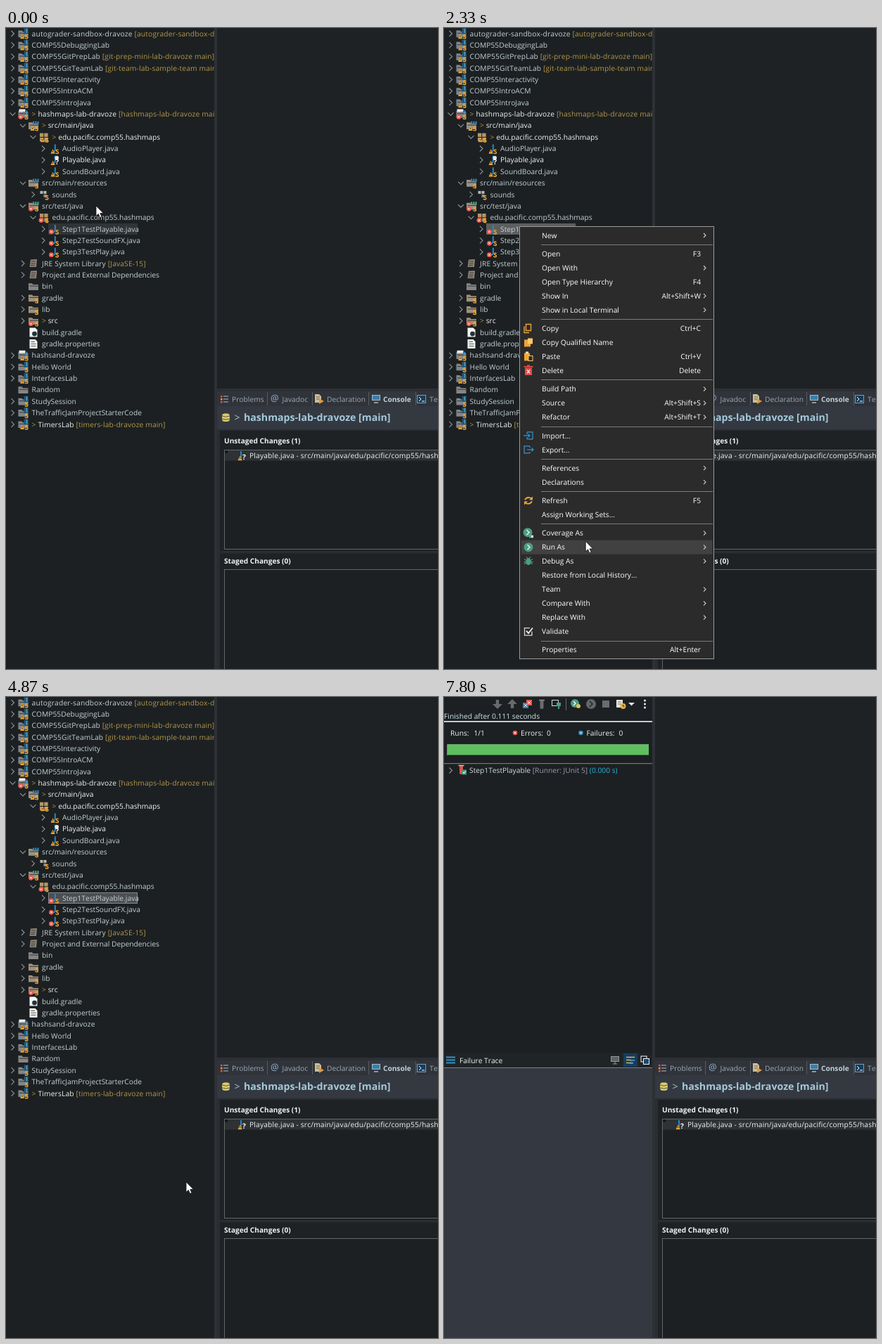
An HTML page that plays this animation: 614x912 px, repeating every 9390 ms.

```html
<!DOCTYPE html>
<html lang="en">
<head>
<meta charset="utf-8">
<title>Running a unit test from the project tree</title>
<style>
html, body { margin: 0; width: 100%; height: 100%; overflow: hidden; background: #1c2022; }
svg { display: block; }
text {
  font-family: "Open Sans", "Noto Sans", sans-serif; font-size: 10.25px; white-space: pre;
  font-kerning: none; font-variant-ligatures: none; text-rendering: geometricPrecision;
}
.bold { font-weight: 700; font-size: 10.15px; }
.end { text-anchor: end; }
.loose { letter-spacing: .15px; }
</style>
</head>
<body>
<svg id="stage" width="614" height="912" viewBox="0 0 614 912"></svg>
<script>
const LOOP = 9390;
const PALE = '#c4d0d4', WHITE = '#f0f2f2', TAN = '#b3964a', ORANGE = '#f0a732', BLUE = '#2f86bd', RED = '#f0574a', GREEN = '#4d9c80';

// Drawing helpers; y is the vertical middle of a line of text.
const rect = (x, y, w, h, fill, extra = '') => `<rect x="${x}" y="${y}" width="${w}" height="${h}" fill="${fill}" ${extra}/>`;
const path = (d, fill, extra = '') => `<path d="${d}" fill="${fill}" ${extra}/>`;
const line = (d, color, width = 1) => path(d, 'none', `stroke="${color}" stroke-width="${width}"`);
const dot = (x, y, r, fill) => `<circle cx="${x}" cy="${y}" r="${r}" fill="${fill}"/>`;
const text = (x, y, s, fill = PALE, extra = '') => `<text x="${x}" y="${y + 3.6}" fill="${fill}" ${extra}>${s}</text>`;
const span = (s, fill) => `<tspan fill="${fill}">${s}</tspan>`;
const at = (x, y, s) => `<g transform="translate(${x} ${y})">${s}</g>`;
const group = (id, s) => `<g id="${id}">${s}</g>`;
const frame = (x, y, w, h, fill, stroke) => rect(x, y, w, h, fill, `stroke="${stroke}"`);

const cross = (r, fill) => dot(0, 0, r, fill) + line('M-1.3-1.3L1.3 1.3M1.3-1.3L-1.3 1.3', '#fff', 0.9);
const marks = {
  warn: path('M-4.5 7.2L-1.4.8L1.7 7.2Z', ORANGE) + line('M-1.4 3v2.2', '#3a2a08', 0.9),
  err: at(-3.6, 4, cross(3.4, RED)),
  none: ''
};
const store = line('M6.6 2.2C4 .8 2.2 2.6 4 3.7S7 5 6.4 6.3 3.6 7.2 2.3 6.2', ORANGE, 1.4);
const folder = fill => path('M-7-4.5h5l1.6 1.8H7V5.2H-7Z', fill) + line('M-5.5-.6H7.5', '#33312f', 0.9);
const doc = path('M-5.5-6.5H2.5L5.5-3.5V6.5H-5.5Z', '#f3f3f0');
const letterJ = line('M1.8-6V1.5Q1.6 4.6-1.5 4', BLUE, 2);

const shapes = {
  project: folder('#80868a') + path('M1-7.5H7V.5H1Z', '#24566f') + line('M5-7V-1', '#49a2d4', 1.6) + store,
  linked: folder('#80868a') + path('M-6-7H3V-3H-6Z', '#e8eaea') + line('M5-5V0', '#49a2d4', 1.8) + store,
  source: folder('#9a9184') + [-1, 2.2, 5.4].map(x => rect(x, -6, 2.2, 4.5, BLUE)).join('') + store,
  tests: folder('#9a9184') + [-1, 2.2, 5.4].map(x => rect(x, -6, 2.2, 4.5, '#4aa586')).join('') + store,
  pack: [-5.5, 0.8].map(x => [-5.5, 0.8].map(y => rect(x, y, 5.3, 5.3, '#b69668')).join('')).join('') + store,
  sounds: [-5, 0].map(x => rect(x, -5, 4, 4, '#b9b6ae')).join('') + rect(0, 0, 4, 4, '#8f8d88') + store,
  java: letterJ + store,
  draft: letterJ + dot(4.2, -3, 2.8, '#e5e8ea') + text(2.2, 3, '?', '#fff', 'class="bold"'),
  library: path('M-4-5.5L5-6L4 5H-5.5Z', '#8d8378') + line('M-3-3H3M-3.5 0H2.7M-4 2.6H2', '#3b3734'),
  folder: folder('#a0917a') + store,
  plain: folder('#858585'),
  build: doc + dot(1.5, 2, 3.4, '#20353c'),
  props: doc + line('M-3.5-3H2M-3.5 0H3.5M-3.5 3H3.5', '#555', 1.1)
};
const icon = (kind, x, y, mark = 'none') => at(x, y, shapes[kind] + marks[mark]);
const chevron = (x, y, open) =>
  line(open ? `M${x - 4} ${y - 2}l4 4l4-4` : `M${x - 2} ${y - 4}l4 4l-4 4`, '#8b9194', 1.2);

// depth, arrow (+ closed, - open, . none), icon, mark, label, branch note; a leading ">" or "!" marks a changed item
const USER = 'dravoze';
const ROWS = `0 + project warn|autograder-sandbox-${USER}|[autograder-sandbox-${USER} main]
0 + project warn|COMP55DebuggingLab
0 + project warn|COMP55GitPrepLab|[git-prep-mini-lab-${USER} main]
0 + project warn|COMP55GitTeamLab|[git-team-lab-sample-team main]
0 + project warn|COMP55Interactivity
0 + project warn|COMP55IntroACM
0 + project warn|COMP55IntroJava
0 - linked err|>hashmaps-lab-${USER}|[hashmaps-lab-${USER} main]
1 - source warn|>src/main/java
2 - pack warn|>edu.pacific.comp55.hashmaps
3 + java warn|AudioPlayer.java
3 + draft warn|!Playable.java
3 + java warn|SoundBoard.java
1 - source none|src/main/resources
2 + sounds none|sounds
1 - tests err|src/test/java
2 - pack err|edu.pacific.comp55.hashmaps
3 + java err|Step1TestPlayable.java
3 + java err|Step2TestSoundFX.java
3 + java err|Step3TestPlay.java
1 + library none|JRE System Library|[JavaSE-15]
1 + library none|Project and External Dependencies
1 . plain none|bin
1 + folder none|gradle
1 + folder none|lib
1 + folder err|>src
1 . build none|build.gradle
1 . props none|gradle.properties
0 + linked warn|hashsand-${USER}
0 + project none|Hello World
0 + project warn|InterfacesLab
0 . plain none|Random
0 + project none|StudySession
0 + project none|TheTrafficJamProjectStarterCode
0 + project warn|>TimersLab|[timers-lab-${USER} main]`;

function treeRow(row, i) {
  const [spec, label, note = ''] = row.split('|');
  const [depth, arrow, kind, mark] = spec.split(' ');
  const x = depth * 14.5, y = 8 + i * 16.35;
  const changed = /^[>!]/.test(label);
  const name = span(label.replace(/^[>!]/, ''), changed ? WHITE : PALE);
  const s = (label[0] === '>' ? span('> ', TAN) : '') + name + (note && span(' ' + note, TAN));
  const style = (label + note).includes('-') ? 'class="loose"' : '';
  return (arrow === '.' ? '' : chevron(x + 9.5, y, arrow === '-')) +
    icon(kind, x + 24.5, y, mark) + text(x + 36.6, y, s, PALE, style);
}

const tree = rect(44, 262, 169, 16, '#35393c', 'id="hover"') +
  rect(60.5, 278.5, 126, 15, '#303437', 'id="picked"') +
  ROWS.split('\n').map(treeRow).join('');

const arrowUp = 'M0-7L7 0H2.2V6H-2.2V0H-7Z';
const junit = rect(0, 0, 296, 912, '#1c2022') +
  path(arrowUp, '#666b6e', 'transform="translate(76 10) rotate(180)"') +
  path(arrowUp, '#666b6e', 'transform="translate(97 10)"') +
  rect(112, 8, 8, 8, BLUE) + rect(117, 4, 8, 8, RED) +
  line('M114 10l4 4M118 10l-4 4M119 6l4 4M123 6l-4 4', '#fff', 0.9) +
  rect(136.5, 4, 5, 13, '#686c6e', 'rx="2"') + line('M135 4.5h8', '#898d8f', 1.5) +
  frame(153.5, 4.5, 9, 8, 'none', '#d5d9da') + path('M160 8h6v5h-2v4h-2v-4h-2Z', GREEN) +
  line('M173.5 2v17', '#65696b') +
  dot(186, 9, 6, GREEN) + line('M184 6l3 3l-3 3', '#fff', 1.3) + dot(191, 13, 3, '#e9bd57') +
  dot(209, 10, 7, '#62676a') + line('M207 6l4 4l-4 4', '#25292b', 1.5) +
  rect(225, 5, 10, 10, RED, 'id="stop"') +
  rect(245, 4, 9, 11, '#e9e5d8') + line('M247 7h5M247 10h5', '#777') + dot(254.5, 13, 4, '#e0ae4e') + line('M254.5 11v2.2h2', '#3c3421') +
  path('M262 8h9l-4.5 4.5Z', '#dde0e1') + [5, 10, 15].map(y => dot(285.5, y, 1.5, '#e6e8e8')).join('') +
  text(0, 27, 'Finished after 0.111 seconds', '#cfe4e8') + rect(0, 34, 296, 1.8, '#d9dcdd') +
  text(9, 51.5, 'Runs:', WHITE) + text(42.5, 51.5, '0/1', WHITE, 'id="runs"') +
  at(101, 51, cross(3.3, RED)) + text(109, 51.5, 'Errors:', WHITE) + text(146, 51.5, '0', WHITE) +
  at(194.5, 51, cross(3.3, BLUE)) + text(202.5, 51.5, 'Failures:', WHITE) + text(248.5, 51.5, '0', WHITE) +
  line('M4.5 83V67.5H291', '#7b7f81') + rect(0, 94, 296, 1.2, '#72777a') +
  group('result', rect(5, 67.5, 286, 15, '#5fbf60') + chevron(9.5, 104.5, false) +
    rect(22, 97, 5, 13, '#d95349', 'rx="2"') + line('M20.5 97.5h8', '#e8b6ae', 1.5) +
    rect(25.5, 103.5, 6.5, 7, '#3b9e78') + line('M27 107l1.4 1.5l2.4-3', '#fff', 1.1) +
    text(36, 104, span('Step1TestPlayable', '#d2dcdf') + span(' [Runner: JUnit 5]', '#9c98aa') + span(' (0.000 s)', '#27b5de'))) +
  rect(0, 506, 296, 21, '#202427') + rect(0, 528, 296, 384, '#343840') + line('M0 527.5H296', '#7d8285') +
  line('M3 512.5h13M3 516.5h13M3 520.5h13', '#2f93cc', 1.8) + text(22, 517, 'Failure Trace', WHITE) +
  frame(237.5, 511.5, 11, 7, '#5d6265', '#92979a') + line('M240 522h6M243 519v3', '#92979a') +
  rect(255, 507, 20, 19, '#173d5e') + line('M259 512.5h12M259 516.5h7M259 520.5h9', '#d9b45b', 1.5) + line('M265 517h6M263 521h6', '#4da4d6', 1.4) +
  frame(280, 511, 8, 8, 'none', '#f0f3f4') + frame(283.5, 514.5, 8, 8, '#174b70', '#f0f3f4');

const listIcon = at(334, 608, line('M0-6V4', BLUE, 2) + marks.warn + text(2, 2, '?', '#fff', 'class="bold"'));
const tabText = '#9ba9b1';
const side = rect(296, 0, 4, 912, '#2d3034') + rect(300, 0, 314, 514, '#1e2224') +
  rect(300, 513, 314, 3.5, '#2d3034') + rect(300, 516.5, 314, 22, '#30333a') +
  rect(516, 516.5, 66, 22, '#33373e') + rect(300, 538, 314, 34, '#343941') +
  rect(300, 571, 314, 341, '#2a2d31') + rect(304, 573, 310, 339, '#1e2225') +
  rect(304, 744, 310, 3.5, '#2a2d31') +
  [371.5, 435.5, 515.5, 582.5].map(x => line(`M${x} 518v19`, '#555b62')).join('') +
  [523, 527, 531].map((y, i) => rect(305, y, 2.5, 2.5, i === 1 ? ORANGE : RED) + line(`M309 ${y + 1}h7`, '#8b949b', 1.4)).join('') +
  text(321, 528, 'Problems', tabText) +
  text(376, 527, '@', '#91b6d2', 'style="font-size:13px"') + text(392.5, 528, 'Javadoc', tabText) +
  path('M439 521h6l3 3v9h-9Z', '#cbbd96') + line('M441 525h5M441 528h5', '#6b644e') + path('M445 527l7 4l-7 4Z', '#dc9c40') +
  text(456, 528, 'Declaration', tabText) +
  frame(520.5, 522.5, 11, 7, '#3580ac', '#a9bbc4') + line('M523 533h6', '#a9bbc4', 1.5) +
  text(536, 528, 'Console', '#c2d0d7', 'class="bold"') +
  frame(584.5, 522.5, 12, 11, '#163d5c', '#7d9db3') + line('M587 525l3 3l-3 3M591 531h4', '#fff') + text(602, 528, 'Terminal', tabText) +
  rect(307, 548.5, 11, 11.5, '#d9cb70', 'rx="4"') + line('M307 552q5.5 2.5 11 0M307 556q5.5 2.5 11 0', '#5d562c') +
  `<text x="324.5" y="559" fill="#a9c5d2" style="font-size:14px">&gt;</text>` +
  `<text x="338" y="559" fill="#a4cadb" class="bold" style="font-size:14.15px">hashmaps-lab-${USER} [main]</text>` +
  text(310, 587, 'Unstaged Changes (1)', WHITE, 'class="bold"') +
  frame(310.5, 600.5, 310, 141, '#1c2022', '#62676a') + rect(311, 601, 303, 14.5, '#2e3235') + rect(311, 601, 4, 4, '#15181a') +
  listIcon + text(346, 608, 'Playable.java - src/main/java/edu/pacific/comp55/hashmaps', WHITE, 'class="loose"') +
  text(310, 758, 'Staged Changes (0)', WHITE, 'class="bold"') +
  frame(310.5, 770.5, 310, 150, '#1c2022', '#62676a');

// Context menu glyphs, centred on their row.
const port = (color, d) => line('M-2-5H6V5H-2M-2-5V-2M-2 5V2', color, 1.2) + line(d, color, 1.2);
const play = dot(0, 0, 6.5, GREEN) + line('M-1.5-3.5L2 0L-1.5 3.5', '#e8f5ee', 1.4);
const glyphs = {
  Copy: line('M-3.5-6H3.5V3H-3.5ZM-6-3V6H1', '#eaa53c', 1.4),
  'Copy Qualified Name': frame(-5.5, -3.5, 8, 9, '#eaa53c', '#eaa53c') + rect(-1, -6, 7, 8, '#ffc968'),
  Paste: rect(-6, -5, 8, 11, ORANGE) + rect(-4, -7, 4, 3, '#ffd897') + frame(0, -1, 6, 7, '#2b2b2b', '#ffc968'),
  Delete: rect(-5, -4, 10, 10.5, '#e34a44') + line('M-6.5-5.5H6.5M-2-7H2', '#e34a44', 1.7) + line('M-2-1L2 4M2-1L-2 4', '#fff', 1.2),
  'Import...': port('#3797ce', 'M-7 0H2M-.5-2.5L2 0L-.5 2.5'),
  'Export...': line('M2-5H-6V5H2M2-5V-3M2 5V3', '#3797ce', 1.2) + line('M-2 0H7M4.5-2.5L7 0L4.5 2.5', '#3797ce', 1.2),
  Refresh: line('M-5-1Q-3-5 1-4.4T5-2M5 1Q3 5-1 4.4T-5 2', '#f0a53c', 1.8) + path('M6-6V-1H1ZM-6 6V1H-1Z', '#f0a53c'),
  'Coverage As': at(-1, -1, play) + rect(1, 3, 6, 3.5, '#f0f0f0') + rect(1, 3, 3, 3.5, '#54a478'),
  'Run As': play,
  'Debug As': line('M-6-3L6 4M6-3L-6 4M-6.5 1H6.5M-3-6L0-3L3-6', GREEN, 1.2) + `<ellipse cy=".5" rx="3.6" ry="5" fill="${GREEN}"/>`,
  Validate: line('M5 0V5.5H-5.5V-5H2', '#d8d8d8', 1.3) + line('M-3-1L0 2.5L6-5', '#f2f2f2', 1.7)
};
const MENU = `New|>;-;Open|F3;Open With|>;Open Type Hierarchy|F4;Show In|Alt+Shift+W >;Show in Local Terminal|>;-;Copy|Ctrl+C;Copy Qualified Name;Paste|Ctrl+V;Delete|Delete;-;Build Path|>;Source|Alt+Shift+S >;Refactor|Alt+Shift+T >;-;Import...;Export...;-;References|>;Declarations|>;-;Refresh|F5;Assign Working Sets...;-;Coverage As|>;Run As|>;Debug As|>;Restore from Local History...;Team|>;Compare With|>;Replace With|>;Validate;-;Properties|Alt+Enter`;

const menuRows = [];
function menu() {
  let y = 295, s = '';
  for (const item of MENU.split(';')) {
    if (item === '-') {
      s += line(`M138 ${Math.round(y - 7) + 0.5}H382`, '#7c7c7c');
      y += 6.3;
      continue;
    }
    const [label, keys = ''] = item.split('|');
    menuRows.push(y);
    if (glyphs[label]) s += at(120, y, glyphs[label]);
    s += text(139, y, label, '#fff') + text(365, y, keys.replace(/ ?>/, ''), '#fff', 'class="end"');
    if (keys.endsWith('>')) s += line(`M369 ${y - 3}l3 3l-3 3`, '#d2d2d2', 1.1);
    y += 19.98;
  }
  return frame(107.5, 282.5, 276, 615, '#2b2b2b', '#9a9a9a') + rect(110, 0, 271.5, 20, '#414141', 'id="bar"') + s;
}

const junitItem = rect(386, 753, 11, 11, '#c8473c') + text(411, 759.5, '2 JUnit Test', '#fff') + text(610, 759.5, 'Alt+Shift+X, T', '#fff', 'class="end"');
const submenu = frame(379.5, 727.5, 240, 70, '#2b2b2b', '#9a9a9a') + rect(382, 749.5, 232, 20, '#414141', 'id="subBar"') +
  dot(392, 739.5, 6, '#27586a') + text(411, 739.5, '1 Gradle Test', '#fff') + text(610, 739.5, 'Ctrl+Alt+X, G', '#fff', 'class="end"') +
  junitItem + line('M410 772.5H614', '#7c7c7c') + text(411, 785.5, 'Run Configurations...', '#fff');

const stage = document.getElementById('stage');
stage.innerHTML = rect(0, 0, 614, 912, '#1c2022') +
  `<svg width="296" height="912">${group('tree', tree)}${group('junit', junit)}</svg>` + side +
  group('menu', menu()) + group('submenu', submenu) +
  group('chosen', rect(382, 749.5, 232, 20, '#414141') + junitItem) +
  group('cursor', path('M0 0V14.6L3.3 11.5L5.6 16.6L8 15.6L5.8 10.6H10.4Z', '#fff', 'stroke="#111" stroke-width=".8"'));

const el = {};
stage.querySelectorAll('[id]').forEach(node => el[node.id] = node);
const show = (node, on) => node.setAttribute('opacity', Number(on));

// Pointer stops: time, x, y. Repeated places are rests.
const STOPS = [
  [0, 128, 253], [470, 107, 283], [1400, 107, 283], [1930, 191.5, 629.5], [2200, 198, 711], [2400, 202, 733],
  [2660, 202, 733], [3070, 366.5, 734.5], [3530, 603, 760], [4600, 603, 760], [4870, 256, 690], [5270, 216, 647],
  [5870, 216, 647], [6400, 94, 270], [6800, 117, 162], [6870, 117, 160], [7470, 117, 160],
  [7600, 104, 340], [7730, 150, 760], [7800, 160, 930], [LOOP, 160, 930]
];
function slope(i, axis) {
  const a = STOPS[i - 1], p = STOPS[i], b = STOPS[i + 1];
  const same = q => q[1] === p[1] && q[2] === p[2];
  return !a || !b || same(a) || same(b) ? 0 : (b[axis] - a[axis]) / (b[0] - a[0]);
}
function pointer(t) {
  const i = STOPS.findIndex((p, n) => n === STOPS.length - 1 || t < STOPS[n + 1][0]);
  const a = STOPS[i], b = STOPS[i + 1], length = b[0] - a[0], u = (t - a[0]) / length, v = 1 - u;
  return [1, 2].map(k =>
    a[k] * (1 + 2 * u) * v * v + b[k] * u * u * (3 - 2 * u) +
    length * u * v * (v * slope(i, k) - u * slope(i + 1, k)));
}
const fade = (t, start) => t < start ? 0 : Math.min(1, 0.4 + (t - start) / 200);

function draw(time) {
  const t = Math.round(Math.floor((time + 5) * 0.015) * 20 / 3) * 10;
  const [x, y] = pointer(Math.min(t, LOOP - 1));
  const closed = t >= 4130;

  el.cursor.setAttribute('transform', `translate(${x.toFixed(2)} ${y.toFixed(2)})`);
  show(el.hover, t < 600 && y > 262 && y < 278);
  const lit = closed || t > 600 || y > 278;
  el.picked.setAttribute('fill', closed ? '#4b4f51' : lit ? '#5c5e5f' : '#303437');
  el.picked.setAttribute('stroke', closed ? '#85898b' : lit ? '#5c5e5f' : '#303437');

  show(el.menu, closed ? 0 : fade(t, 1270));
  show(el.submenu, closed ? 0 : fade(t, 2730));
  show(el.chosen, closed ? Math.max(0, (4400 - t) / 340) : 0);
  // "Run As" stays lit while its submenu is in use.
  const aim = t >= 2400 ? 733 : y;
  const over = menuRows.find(row => Math.abs(aim - row) <= 10);
  show(el.bar, t > 1400 && over !== undefined);
  if (over !== undefined) el.bar.setAttribute('y', over - 10);
  show(el.subBar, x > 382 && y > 749);

  const done = t >= 5730;
  show(el.junit, t >= 5530);
  show(el.result, done);
  el.runs.textContent = done ? '1/1' : '0/1';
  el.stop.setAttribute('fill', done ? '#696d6f' : RED);
}

const start = performance.now();
function tick() {
  draw((performance.now() - start) % LOOP);
  requestAnimationFrame(tick);
}
tick();
</script>
</body>
</html>
```
